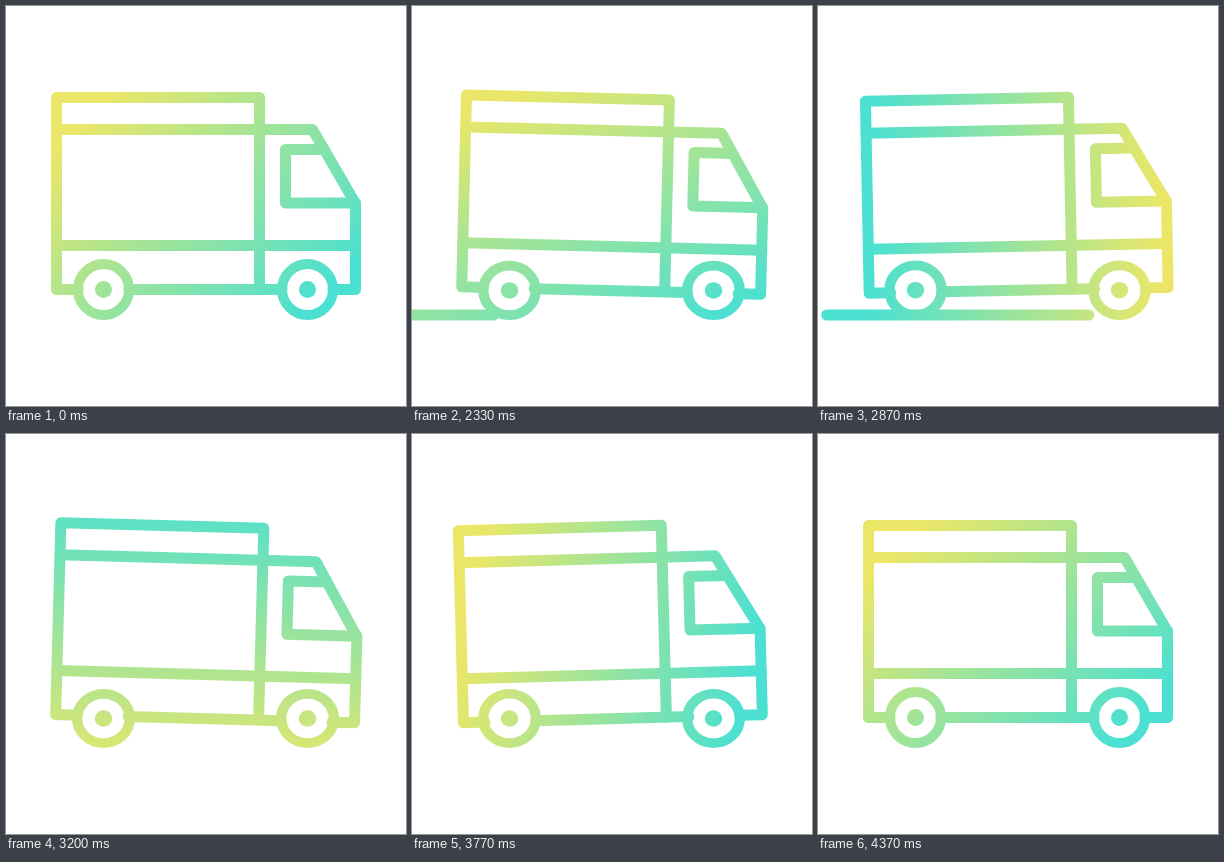
An HTML page with a canvas that plays this animation: 400x400 px, repeating every 4.49 s.

```html
<!DOCTYPE html>
<html>
<head>
<meta charset="utf-8">
<style>
  html, body { margin: 0; width: 100%; height: 100%; overflow: hidden; background: #fff; }
  canvas { display: block; width: 100vmin; height: 100vmin; }
</style>
</head>
<body>
<canvas id="stage" width="400" height="400"></canvas>
<script>
const ctx = document.getElementById('stage').getContext('2d');
const LOOP = 4490, START = 2010, TURN = 2370;
const WHEELS = [97.5, 301.5], AXLE = 283.5, GROUND = 314;

const clamp = v => Math.max(0, Math.min(1, v));

// Cubic bezier easing (.35, 0, .46, 1), solved by bisection
function ease(x) {
  let lo = 0, hi = 1;
  for (let i = 0; i < 24; i++) {
    const s = (lo + hi) / 2, r = 1 - s;
    if (3 * .35 * s * r * r + 3 * .46 * s * s * r + s * s * s < x) lo = s; else hi = s;
  }
  return lo * lo * (3 - 2 * lo);
}

function gradient(angle) {
  const dx = 145 * Math.cos(angle), dy = 145 * Math.sin(angle);
  const g = ctx.createLinearGradient(200 - dx, 200 - dy, 200 + dx, 200 + dy);
  g.addColorStop(0, '#eae768');
  g.addColorStop(1, '#4be0d1');
  return g;
}

function line(...points) {
  ctx.beginPath();
  for (let i = 0; i < points.length; i += 2) ctx.lineTo(points[i], points[i + 1]);
  ctx.stroke();
}

function drawBody(tilt, drop) {
  ctx.save();
  ctx.translate(200, 250 + drop);
  ctx.rotate(tilt);
  ctx.translate(-200, -250);
  line(72, 283.5, 50.5, 283.5, 50.5, 91.5, 253.5, 91.5, 253.5, 283.5);
  line(50.5, 123.5, 306.5, 123.5, 349.5, 197.5, 349.5, 283.5, 327, 283.5);
  line(318, 143.5, 279.5, 143.5, 279.5, 197, 349.5, 197);
  line(50.5, 239.5, 349.5, 239.5);
  line(123, 283.5, 276, 283.5);
  ctx.restore();
}

function drawWheel(x, squash) {
  ctx.save();
  ctx.translate(x, GROUND);
  ctx.scale(1 + squash, 1 - squash);
  ctx.translate(-x, -GROUND);
  ctx.lineWidth = 10;
  ctx.beginPath();
  ctx.arc(x, AXLE, 25.5, 0, 7);
  ctx.stroke();
  ctx.beginPath();
  ctx.arc(x, AXLE, 8.5, 0, 7);
  ctx.fill();
  ctx.restore();
}

function drawRoad(t) {
  for (let i = 0; i < 3; i++) {
    const x = 395 - 1.93 * (t - 2030 - i * 638);
    if (x < 400 && x > -273) line(x + 5.5, 309, x + 267.5, 309);
  }
}

function draw(now) {
  const t = now % LOOP, run = t - START;
  const fade = run < 0 ? 0 : clamp((2310 - run) / 500);
  const wave = fade * Math.sin(2 * Math.PI * run / 980);
  const press = Math.abs(wave);

  ctx.fillStyle = '#fff';
  ctx.fillRect(0, 0, 400, 400);
  const paint = gradient(Math.PI / 4 + 2 * Math.PI * ease(clamp(run / TURN)));
  ctx.strokeStyle = ctx.fillStyle = paint;
  ctx.lineWidth = 11;
  ctx.lineCap = ctx.lineJoin = 'round';
  drawRoad(t);
  drawBody(.028 * wave, 1.2 * press);
  for (const x of WHEELS) drawWheel(x, .033 * press);
}

const begin = performance.now();
function frame() {
  draw(performance.now() - begin);
  requestAnimationFrame(frame);
}
frame();
</script>
</body>
</html>
```
